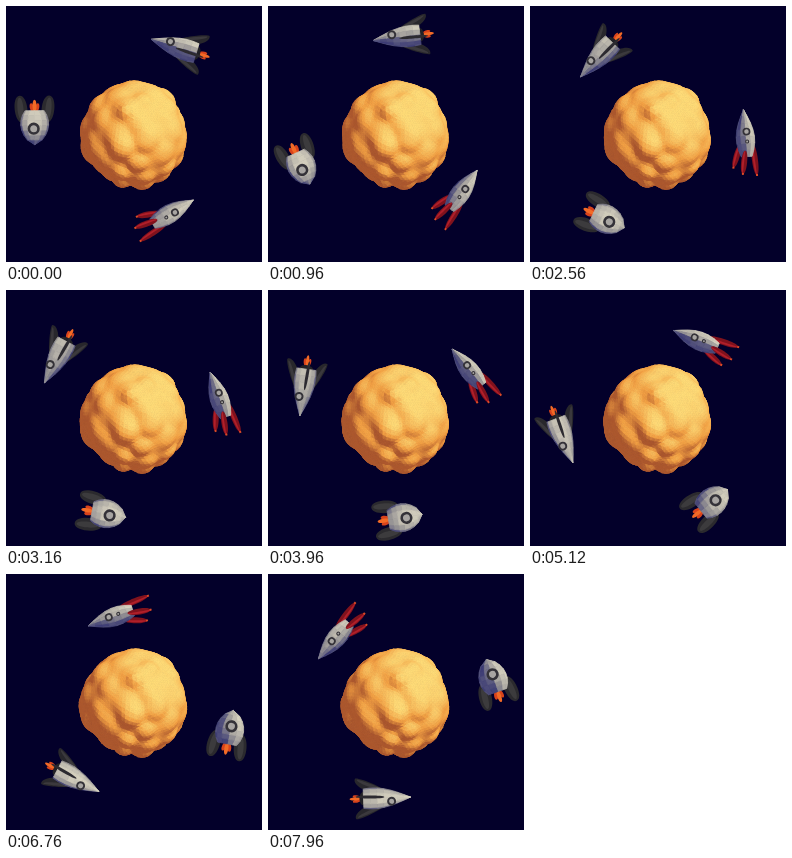
An HTML page with a canvas for the animation above (8000 ms loop, 256 by 256 pixels).

```html
<!DOCTYPE html>
<html lang="en">
<head>
<meta charset="utf-8">
<title>Rockets in orbit</title>
<style>
html, body { margin: 0; width: 100%; height: 100%; overflow: hidden; background: #03002a; }
canvas { display: block; width: 100vw; height: 100vh; }
</style>
</head>
<body>
<canvas width="256" height="256"></canvas>
<script>
const ctx = document.querySelector('canvas').getContext('2d');
const LOOP = 8000, STEP = 40, DEG = Math.PI / 180;
const ORBIT_SPEED = -25 * DEG, SPIN_SPEED = 1.65 * DEG;
const VIEW_TILT = 28 * DEG; // perspective shows the inner flank of each rocket

const dot = (a, b) => a[0] * b[0] + a[1] * b[1] + a[2] * b[2];
const sub = (a, b) => a.map((v, i) => v - b[i]);
const scale = (a, k) => a.map(v => v * k);
const unit = a => scale(a, 1 / Math.hypot(...a));
const cross = (a, b) => [a[1] * b[2] - a[2] * b[1], a[2] * b[0] - a[0] * b[2], a[0] * b[1] - a[1] * b[0]];
const middle = pts => [0, 1, 2].map(i => pts.reduce((s, p) => s + p[i], 0) / pts.length);
const hash = n => { const s = Math.sin(n * 127.1) * 43758.5; return s - Math.floor(s); };

const spinX = a => ([x, y, z]) => [x, y * Math.cos(a) - z * Math.sin(a), z * Math.cos(a) + y * Math.sin(a)];
const spinY = a => ([x, y, z]) => [x * Math.cos(a) + z * Math.sin(a), y, z * Math.cos(a) - x * Math.sin(a)];
const spinZ = a => ([x, y, z]) => [x * Math.cos(a) - y * Math.sin(a), x * Math.sin(a) + y * Math.cos(a), z];

const LIGHT = unit([0.46, -0.5, 0.74]);
const GOLD = { dark: [150, 66, 40], mid: [242, 160, 68], light: [255, 222, 122] };
const CLAY = { dark: [48, 48, 112], mid: [150, 147, 148], light: [216, 211, 192] };

function tone(ramp, level) {
  const v = Math.max(0, Math.min(1, level)) * 2;
  const [from, to] = v < 1 ? [ramp.dark, ramp.mid] : [ramp.mid, ramp.light];
  return `rgb(${from.map((c, i) => Math.round(c + (to[i] - c) * (v < 1 ? v : v - 1)))})`;
}

function makeFace(pts, seed) {
  const mid = middle(pts);
  let normal = unit(cross(sub(pts[1], pts[0]), sub(pts[2], pts[0])));
  if (dot(normal, mid) < 0) normal = scale(normal, -1);
  return { pts, mid, normal, tint: hash(seed) - 0.5 };
}

function drawMesh(faces, turn, lightTurn, ramp, grain) {
  ctx.lineWidth = 0.8;
  faces.filter(f => turn(f.normal)[2] > 0)
    .map(f => ({ f, z: turn(f.mid)[2] }))
    .sort((a, b) => a.z - b.z)
    .forEach(({ f }) => {
      const lit = Math.max(0, dot(lightTurn(f.normal), LIGHT));
      ctx.fillStyle = ctx.strokeStyle = tone(ramp, 0.12 + 0.86 * lit + f.tint * grain);
      ctx.beginPath();
      f.pts.map(turn).forEach(p => ctx.lineTo(p[0], p[1]));
      ctx.closePath();
      ctx.fill();
      ctx.stroke();
    });
}

// Lumps: a knob and a broad ridge in front, the rest on a seeded golden spiral.
const onSphere = (x, y) => [x, y, Math.sqrt(1 - x * x - y * y)];
const lumps = [
  { at: onSphere(-0.15, -0.42), height: 0.08, width: 0.13 },
  { at: onSphere(-0.3, 0.2), height: 0.09, width: 0.26 }
];
const SPIRAL = 54;
for (let i = 0; i < SPIRAL; i++) {
  const y = 1 - (2 * i + 1) / SPIRAL, turn = i * 2.39996 + hash(i) * 0.3, r = Math.sqrt(1 - y * y);
  lumps.push({
    at: [r * Math.cos(turn), y, r * Math.sin(turn)],
    height: 0.03 + 0.09 * hash(i + 60),
    width: 0.16 + 0.1 * hash(i + 120)
  });
}

function swell(d) {
  let r = 1;
  for (const { at, height, width } of lumps) {
    const gap = sub(d, at);
    r += height * Math.exp(-((dot(gap, gap) / (width * width)) ** 1.5));
  }
  return scale(d, r * 50);
}

function makePlanet() {
  const g = (1 + Math.sqrt(5)) / 2, corners = [], faces = [];
  for (const a of [-1, 1]) for (const b of [-g, g]) corners.push([0, a, b], [a, b, 0], [b, 0, a]);
  const near = (a, b) => Math.hypot(...sub(a, b)) < 2.1;
  const split = (a, b, c, depth) => {
    if (!depth) {
      faces.push(makeFace([a, b, c].map(swell), faces.length));
      return;
    }
    const [ab, bc, ca] = [[a, b], [b, c], [c, a]].map(e => unit(middle(e)));
    split(a, ab, ca, depth - 1);
    split(b, bc, ab, depth - 1);
    split(c, ca, bc, depth - 1);
    split(ab, bc, ca, depth - 1);
  };
  corners.forEach((a, i) => corners.forEach((b, j) => corners.forEach((c, k) => {
    if (i < j && j < k && near(a, b) && near(b, c) && near(a, c)) split(unit(a), unit(b), unit(c), 4);
  })));
  return faces;
}

// Turned hull along x; sweep sets how far the sine outline closes at the tail.
function makeHull({ nose, tail, radius, sweep, power }, rings = 7, sides = 12) {
  const faces = [];
  const at = (ring, side) => {
    const t = ring / rings, a = side * 2 * Math.PI / sides;
    const r = radius * Math.sin(Math.PI * sweep * t) ** power;
    return [nose + (tail - nose) * t, r * Math.cos(a), r * Math.sin(a)];
  };
  for (let i = 0; i < rings; i++) {
    for (let j = 0; j < sides; j++) {
      const quad = [at(i, j), at(i, j + 1), at(i + 1, j + 1), at(i + 1, j)];
      faces.push(makeFace(i ? quad : quad.slice(1), faces.length + 7));
    }
  }
  return faces;
}

// Leaf from root to tip, with a separate bulge on each side.
function leaf([x0, y0], [x1, y1], left, right, fill) {
  const length = Math.hypot(x1 - x0, y1 - y0);
  const nx = (y1 - y0) / length, ny = (x0 - x1) / length;
  ctx.beginPath();
  ctx.moveTo(x0, y0);
  ctx.bezierCurveTo(x0 + nx * left, y0 + ny * left, x1 + nx * left, y1 + ny * left, x1, y1);
  ctx.bezierCurveTo(x1 - nx * right, y1 - ny * right, x0 - nx * right, y0 - ny * right, x0, y0);
  ctx.fillStyle = fill;
  ctx.fill();
}

function flame(x, length, width) {
  for (const side of [-1, 1, 0]) {
    const reach = length * (side ? 0.7 : 1);
    leaf([x, side * width * 0.4], [x - reach, side * width * 0.8], width * 0.6, width * 0.6, side ? '#d8431c' : '#f26a26');
  }
}

function porthole(x, y, radius, width) {
  ctx.beginPath();
  ctx.arc(x, y, radius, 0, 7);
  ctx.fillStyle = '#a8a5a2';
  ctx.fill();
  ctx.strokeStyle = '#343238';
  ctx.lineWidth = width;
  ctx.stroke();
}

function pod(root, tip) {
  leaf(root, tip, 4, 4, '#80121d');
  leaf(root, tip, 0, 2.6, '#b01f2a');
  ctx.fillStyle = '#dc4a26';
  ctx.fillRect(tip[0] - 1, tip[1] - 1, 2, 2);
}

const swept = {
  start: -63, radius: 97, lean: -10,
  hull: makeHull({ nose: 28, tail: -19, radius: 10.5, sweep: 0.62, power: 1 }),
  back() {
    flame(-22, 11, 3.5);
    leaf([-15, 0], [-23, 0], 9, 9, '#222126');
    for (const side of [-1, 1]) {
      const inner = side < 0 ? 9 : 3, outer = 12 - inner;
      leaf([2, side * 7], [-27, side * 20], inner, outer, '#28272c');
      leaf([0, side * 9], [-25, side * 19], inner / 3, outer / 3, '#3b393d');
    }
  },
  front() {
    leaf([2, -1], [-27, -2], 2, 2, '#2c2a30');
    porthole(9, 3.5, 3.5, 2);
  }
};

const round = {
  start: -173.5, radius: 100, lean: -7,
  hull: makeHull({ nose: 22, tail: -12, radius: 14, sweep: 0.82, power: 0.6 }),
  back() {
    flame(-11, 12, 4.5);
    for (const side of [-1, 1]) {
      leaf([0, side * 12], [-27, side * 15], 8.5, 8.5, '#2b2a2e');
      leaf([-3, side * 13], [-25, side * 15], 4, 4, '#3c3b3d');
    }
  },
  front() { porthole(6, 1, 4.8, 2.6); }
};

const podded = {
  start: 69, radius: 88, lean: -9,
  hull: makeHull({ nose: 32, tail: -15, radius: 9.2, sweep: 0.8, power: 1 }),
  back() {
    pod([-3, -6], [-25, -14]);
    pod([-3, 7], [-34, 9]);
  },
  front() {
    pod([-9, -1], [-32, -5]);
    porthole(10, 1.5, 3.1, 1.7);
    porthole(0, 1.5, 1.5, 1.1);
  }
};

const planet = makePlanet();

function drawRocket(rocket, seconds) {
  const angle = rocket.start * DEG + ORBIT_SPEED * seconds;
  const heading = angle + (rocket.lean - 90) * DEG;
  const turn = spinZ(heading), roll = spinX(VIEW_TILT);
  const local = draw => { ctx.save(); ctx.rotate(heading); draw(); ctx.restore(); };
  ctx.save();
  ctx.translate(128 + rocket.radius * Math.cos(angle), 128 + rocket.radius * Math.sin(angle));
  local(rocket.back);
  drawMesh(rocket.hull, turn, n => turn(roll(n)), CLAY, 0.12);
  local(rocket.front);
  ctx.restore();
}

function render(seconds) {
  ctx.fillStyle = '#03002a';
  ctx.fillRect(0, 0, 256, 256);
  ctx.save();
  ctx.translate(128, 128.5);
  const spin = spinY(SPIN_SPEED * seconds);
  drawMesh(planet, spin, spin, GOLD, 0.02);
  ctx.restore();
  [swept, round, podded].forEach(rocket => drawRocket(rocket, seconds));
}

const begin = performance.now();
let shown = -1;
function tick() {
  const step = Math.floor((performance.now() - begin) % LOOP / STEP);
  if (step !== shown) render(step * STEP / 1000);
  shown = step;
  requestAnimationFrame(tick);
}
tick();
</script>
</body>
</html>
```
